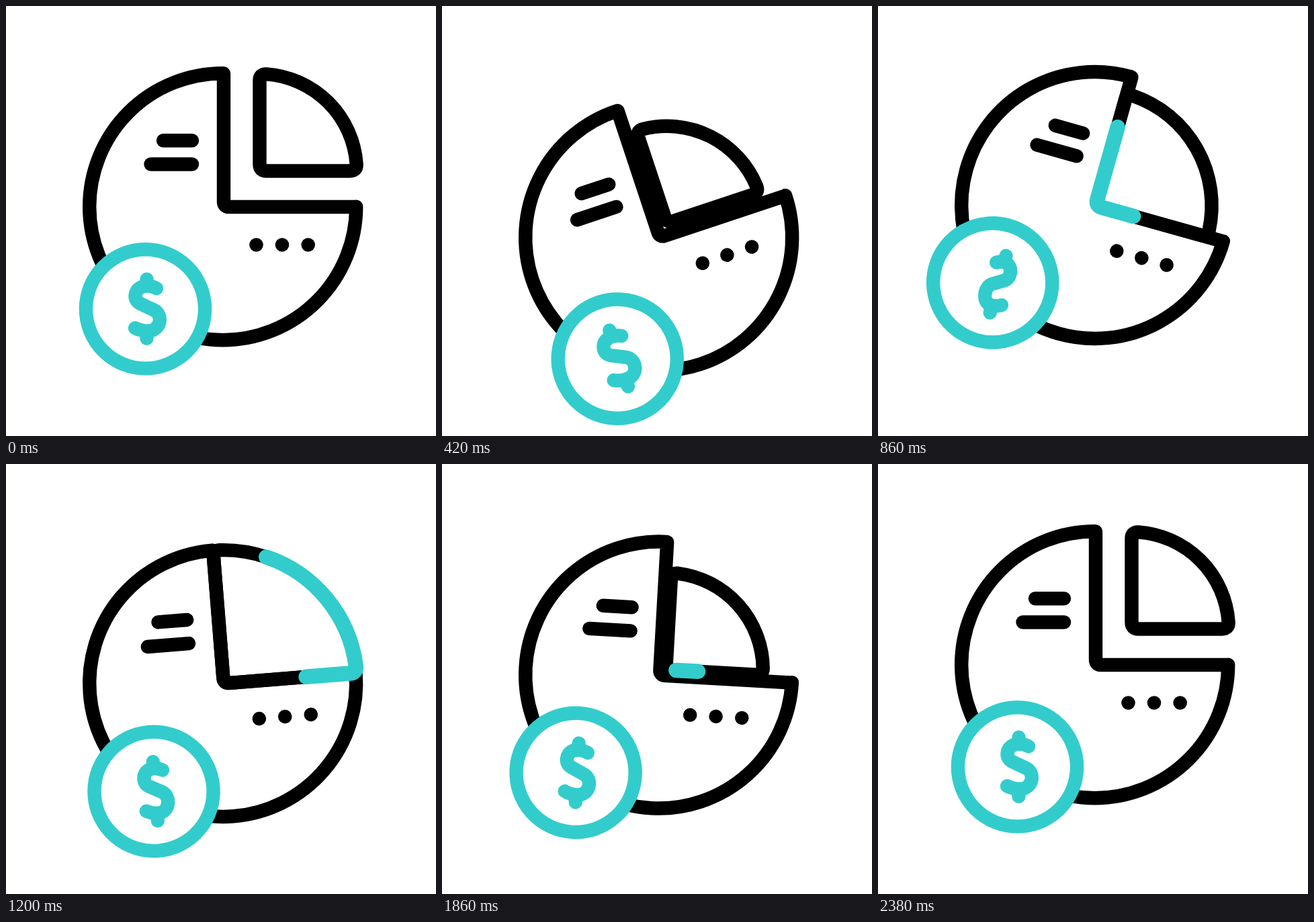
These frames come from a looping animation (640x640 px, 2400 ms). An HTML page with a canvas:

```html
<!DOCTYPE html>
<html lang="en">
<head>
<meta charset="utf-8">
<title>Pie chart and coin</title>
<style>
html, body { margin: 0; width: 100%; height: 100%; overflow: hidden; background: #fff; }
canvas { display: block; width: 640px; height: 640px; }
</style>
</head>
<body>
<canvas id="stage" width="640" height="640"></canvas>
<script>
const ctx = document.getElementById('stage').getContext('2d');
const LOOP = 2400, INK = '#000', CYAN = '#33cccc', LINE = 20.4;
const CENTER = { x: 322.7, y: 298.7 };
const HUB = { x: 324, y: 299 };
const COIN = { x: 207.5, y: 450.8 };

const clamp = (x, low, high) => Math.min(high, Math.max(low, x));
const mix = (a, b, k) => a + (b - a) * k;

// Eased 0..1 between two times.
function ease(t, from, to) {
  const x = clamp((t - from) / (to - from), 0, 1);
  return x * x * (3 - 2 * x);
}

// Swings from one peak to the next in equal steps, then rests.
function swing(t, step, peaks) {
  const i = Math.min(Math.floor(t / step), peaks.length - 2);
  return mix(peaks[i], peaks[i + 1], ease(t, i * step, (i + 1) * step));
}

const bounce = t => swing(t, 355, [0, 54, -36, 51, -20, 18, 0]);
const tilt = t => swing(t, 435, [0, -18.4, 15.7, -8, 4, 0]);
const gap = t => 53.5 * (1 - ease(t, 0, 670) + ease(t, 1695, 2340));
const radius = t => 144.5 + 54 * (ease(t, 500, 1200) - ease(t, 1360, 1860));
const head = t => mix(-0.27, 1.075, ease(t, 430, 1720));
const tail = t => mix(-0.27, 1.075, ease(t, 690, 2040));
const flip = t => Math.cos(2 * Math.PI * clamp((t - 410) / 740, 0, 2));

function stroke(color, width, path) {
  ctx.strokeStyle = color;
  ctx.lineWidth = width;
  path ? ctx.stroke(path) : ctx.stroke();
}

function bar(x0, x1, y) {
  ctx.beginPath();
  ctx.moveTo(x0, y);
  ctx.lineTo(x1, y);
  stroke(INK, LINE);
}

function disc(x, y, r) {
  ctx.beginPath();
  ctx.arc(x, y, r, 0, 2 * Math.PI);
}

function drawPie() {
  ctx.beginPath();
  ctx.arc(CENTER.x, CENTER.y, 198.5, 0, 1.5 * Math.PI);
  ctx.lineTo(HUB.x, 100.5);
  ctx.arcTo(HUB.x, HUB.y, 521, HUB.y, 7);
  ctx.lineTo(521, HUB.y);
  ctx.closePath();
  stroke(INK, LINE);
  bar(234, 277, 200.3);
  bar(215.5, 277, 235.5);
  ctx.fillStyle = INK;
  for (const x of [372.5, 411, 449.7]) {
    disc(x, 355.5, 10.3);
    ctx.fill();
  }
}

// Quarter slice with soft corners, running from its hub to the right, up and back.
function slicePath(x, y, r) {
  const path = new Path2D(), c = 10, a = c / r;
  path.moveTo(x + c, y);
  path.lineTo(x + r - c, y);
  path.quadraticCurveTo(x + r, y, x + r * Math.cos(a), y - r * Math.sin(a));
  path.arc(x, y, r, -a, a - Math.PI / 2, true);
  path.quadraticCurveTo(x, y - r, x, y - r + c);
  path.lineTo(x, y - c);
  path.quadraticCurveTo(x, y, x + c, y);
  path.closePath();
  return path;
}

function drawSlice(t) {
  const g = gap(t), r = radius(t);
  const path = slicePath(HUB.x + g, HUB.y - g, r);
  stroke(INK, LINE, path);
  const from = tail(t), span = head(t) - from;
  if (span <= 0.002) return;
  const length = (2 + Math.PI / 2) * r - 12;
  ctx.setLineDash([span * length, (1 - span) * length]);
  ctx.lineDashOffset = -from * length;
  stroke(CYAN, 22.5, path);
  ctx.setLineDash([]);
}

function drawCoin(t) {
  disc(COIN.x, COIN.y, 88.6);
  ctx.fillStyle = '#fff';
  ctx.fill();
  stroke(CYAN, LINE);

  // The sign turns over while its line keeps full weight.
  const axis = 5.5;
  ctx.save();
  ctx.translate(COIN.x + axis, COIN.y);
  ctx.scale(flip(t), 1);
  ctx.translate(-axis, 0);
  ctx.beginPath();
  ctx.moveTo(16.5, -30.5);
  ctx.quadraticCurveTo(4, -37, -7, -32);
  ctx.bezierCurveTo(-17, -27, -18, -13, -8, -8);
  ctx.lineTo(13, 2);
  ctx.bezierCurveTo(25, 8, 24, 27, 10, 32);
  ctx.quadraticCurveTo(-2, 35, -15.5, 28.5);
  for (const side of [-1, 1]) {
    ctx.moveTo(2, 44 * side);
    ctx.lineTo(2, 35 * side);
  }
  ctx.restore();
  stroke(CYAN, LINE);
}

function draw(t) {
  ctx.setTransform(1, 0, 0, 1, 0, 0);
  ctx.fillStyle = '#fff';
  ctx.fillRect(0, 0, 640, 640);
  ctx.lineCap = ctx.lineJoin = 'round';
  ctx.translate(CENTER.x, CENTER.y + bounce(t));
  ctx.rotate(tilt(t) * Math.PI / 180);
  ctx.translate(-CENTER.x, -CENTER.y);
  drawPie();
  drawSlice(t);
  drawCoin(t);
}

const start = performance.now();
function frame() {
  draw((performance.now() - start) % LOOP);
  requestAnimationFrame(frame);
}
frame();
</script>
</body>
</html>
```
